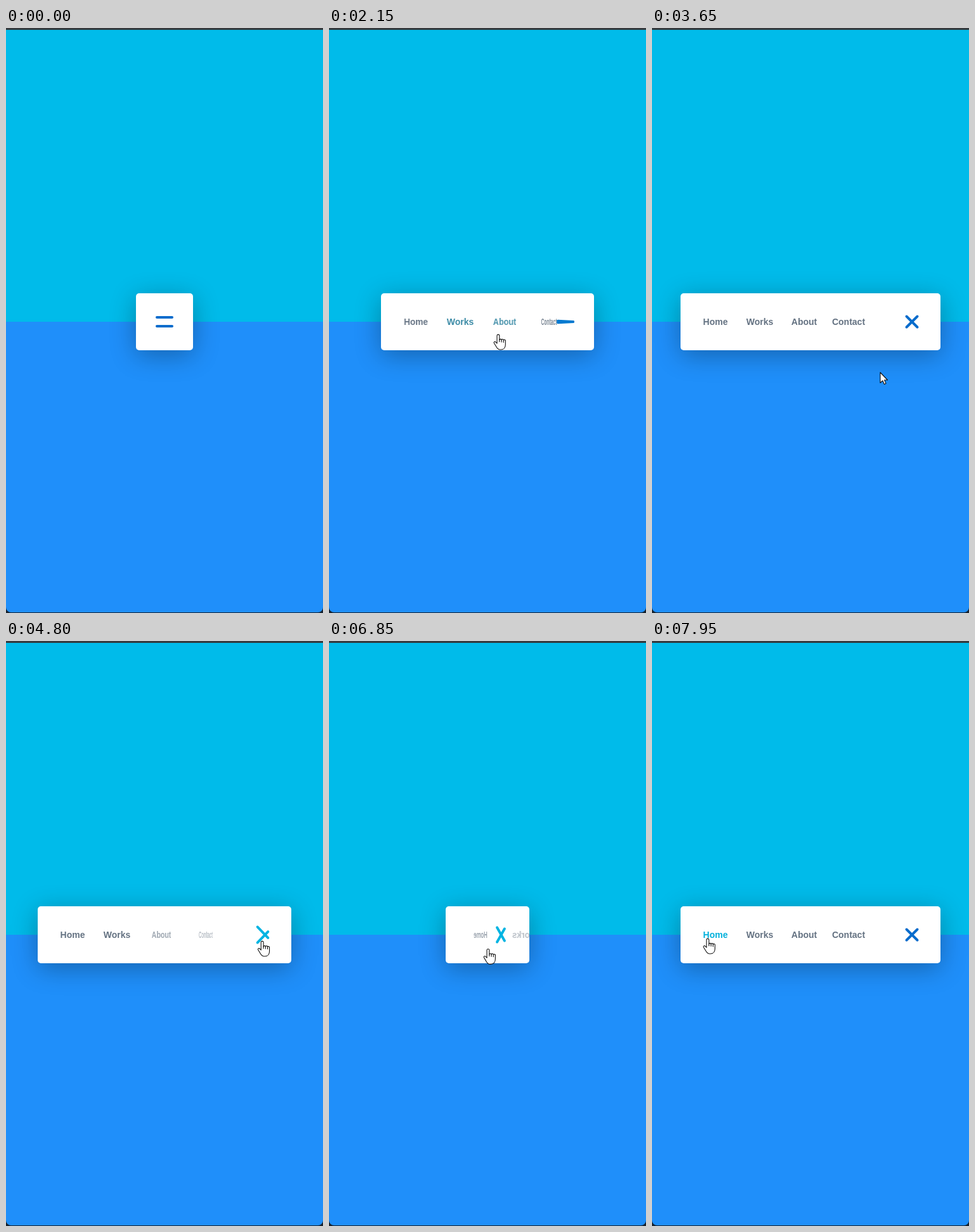
Animation of 500x924 px, one loop 8000 ms. Source, as an HTML page:

```html
<!DOCTYPE html>
<html lang="en">
<head>
<meta charset="utf-8">
<title>Animated navigation</title>
<style>
  html, body { margin: 0; width: 100%; height: 100%; overflow: hidden; background: #17222e; }
  .stage {
    position: relative; width: 500px; height: 924px; overflow: hidden;
    background: #17222e;
  }
  .page {
    position: absolute; left: 0; top: 0; width: 500px; height: 923px;
    border-radius: 0 0 8px 8px;
    background: linear-gradient(#343a3e 3px, #00bbea 3px 464px, #1f8ffa 464px);
  }
  nav {
    position: absolute; top: 419px; height: 90px; overflow: hidden;
    background: #fff; border-radius: 5px; box-shadow: 0 8px 40px rgba(0, 0, 0, .3);
  }
  nav span {
    position: absolute; top: 0; width: 70px; text-align: center;
    font: bold 14px/90px "Liberation Sans", Arial, sans-serif;
  }
  .icon { position: absolute; right: 0; top: 0; width: 90px; height: 90px; }
  .icon i { position: absolute; left: 31px; width: 28px; height: 4px; border-radius: 2px; }
  .icon i:first-child { top: 36px; }
  .icon i:last-child { top: 50px; }
  svg { position: absolute; left: 0; top: 0; overflow: visible; }
  svg path { fill: #fff; stroke: #111; stroke-width: 1.1; stroke-linejoin: round; }
</style>
</head>
<body>
<div class="stage">
  <div class="page"></div>
  <nav>
    <span>Home</span><span>Works</span><span>About</span><span>Contact</span>
    <div class="icon"><i></i><i></i></div>
  </nav>
  <svg width="1" height="1">
    <g id="cursor">
      <path id="arrow" d="M0 0V16.500L3.900 13 6.400 18.800 9 17.600 6.600 12H11.500Z"/>
      <g id="hand">
        <path d="M-2 2a1.900 1.900 0 0 1 3.800 0v6.500a1.700 1.700 0 0 1 3.300 .4a1.600 1.600 0 0 1 3.200 .6a1.500 1.500 0 0 1 3 1v5.500c0 4-2 8-7 8h-1.500c-4 0-5-3-6.800-6l-2.600-4.300c-1-1.800 1.300-3.200 2.700-1.600l1.900 2z"/>
        <path d="M1.800 8v4M5.100 9v3.500M8.300 10v3" fill="none"/>
      </g>
    </g>
  </svg>
</div>
<script>
const LOOP = 8000;
const $ = s => document.querySelector(s);
const nav = $('nav'), items = [...document.querySelectorAll('span')];
const lines = [...document.querySelectorAll('i')];
const cursor = $('#cursor'), arrow = $('#arrow'), hand = $('#hand');

// [time, opens]
const toggles = [[-9000, false], [1750, true], [4725, false], [6700, true]];

// [time, x, y] of the pointer tip
const path = [
  [350, 402, 497], [900, 260, 473], [1650, 260, 473], [2150, 267, 484],
  [2480, 330, 562], [3350, 346, 563], [3650, 360, 544], [4100, 404, 474],
  [6250, 405, 474], [6600, 259, 490], [6750, 255, 489], [7050, 240, 479],
  [7300, 207, 468], [7880, 93, 470], [7950, 88, 470], [8000, 87, 470]
];

const clamp = v => Math.min(1, Math.max(0, v));
const mix = (a, b, k) => a + (b - a) * k;
const rgb = (a, b, k) => `rgb(${a.map((v, i) => Math.round(mix(v, b[i], k)))})`;

function bezier(x1, y1, x2, y2) {
  const at = (a, b, s) => 3 * (1 - s) ** 2 * s * a + 3 * (1 - s) * s * s * b + s ** 3;
  return x => {
    if (x <= 0) return 0;
    if (x >= 1) return 1;
    let lo = 0, hi = 1;
    for (let n = 0; n < 24; n++) {
      const mid = (lo + hi) / 2;
      if (at(x1, x2, mid) < x) lo = mid; else hi = mid;
    }
    return at(y1, y2, lo);
  };
}
const inOut = bezier(.42, 0, .58, 1);
const outBack = bezier(.175, .885, .32, 1.275);

function phase(t) {
  const [start, open] = toggles.filter(k => k[0] <= t).pop();
  return { age: t - start, open };
}

function navWidth(t) {
  const { age, open } = phase(t), k = inOut(age / 600);
  return 90 + 320 * (open ? k : 1 - k);
}

function pointer(t) {
  if (t < path[0][0]) return null;
  const n = Math.max(1, path.findIndex(p => p[0] > t));
  const a = path[n - 1], b = path[n];
  const k = clamp((t - a[0]) / (b[0] - a[0])), s = k * k * (3 - 2 * k);
  return { x: mix(a[1], b[1], s), y: mix(a[2], b[2], s) };
}

// 0..3 for a link, 4 for the button, -1 for nothing
function hovered(t) {
  const p = pointer(t);
  if (!p) return -1;
  const w = navWidth(t), x = p.x - 250 + w / 2;
  if (x < 0 || x > w || p.y < 419 || p.y > 509) return -1;
  if (x > w - 90) return 4;
  const i = Math.floor((x - 20) / 70);
  return i >= 0 && i < 4 && p.y > 434 && p.y < 494 ? i : -1;
}

function tint(t, id) {
  let sum = 0;
  for (let n = 0; n < 10; n++) sum += hovered(t - n * 20) === id;
  return sum / 10;
}

function draw(t) {
  const { age, open } = phase(t), w = navWidth(t);
  nav.style.width = w + 'px';
  nav.style.left = 250 - w / 2 + 'px';

  items.forEach((el, i) => {
    const delay = open ? i * 60 : [130, 85, 55, 42][i];
    const k = outBack((age - delay) / 920);
    el.style.left = 20 + i * 70 + 'px';
    el.style.transform = `rotateY(${360 * (open ? k : 1 - k)}deg)`;
    el.style.opacity = open ? clamp(k) : clamp(1 - k) ** 4;
    el.style.color = rgb([100, 114, 130], [0, 176, 219], tint(t, i));
  });

  const k = outBack(age / 600), q = open ? k : 1 - k;
  const color = rgb([8, 108, 204], [0, 180, 226], tint(t, 4));
  lines.forEach((el, i) => {
    const side = i ? -1 : 1;
    el.style.transform = `translateY(${side * 7 * q}px) rotate(${side * 495 * q}deg)`;
    el.style.background = color;
  });

  const p = pointer(t);
  cursor.style.display = p ? '' : 'none';
  if (p) {
    const link = hovered(t) >= 0;
    cursor.setAttribute('transform', `translate(${p.x} ${p.y})`);
    arrow.style.display = link ? 'none' : '';
    hand.style.display = link ? '' : 'none';
  }
}

const began = performance.now();
function tick() {
  draw((performance.now() - began) % LOOP);
  requestAnimationFrame(tick);
}
tick();
</script>
</body>
</html>
```
